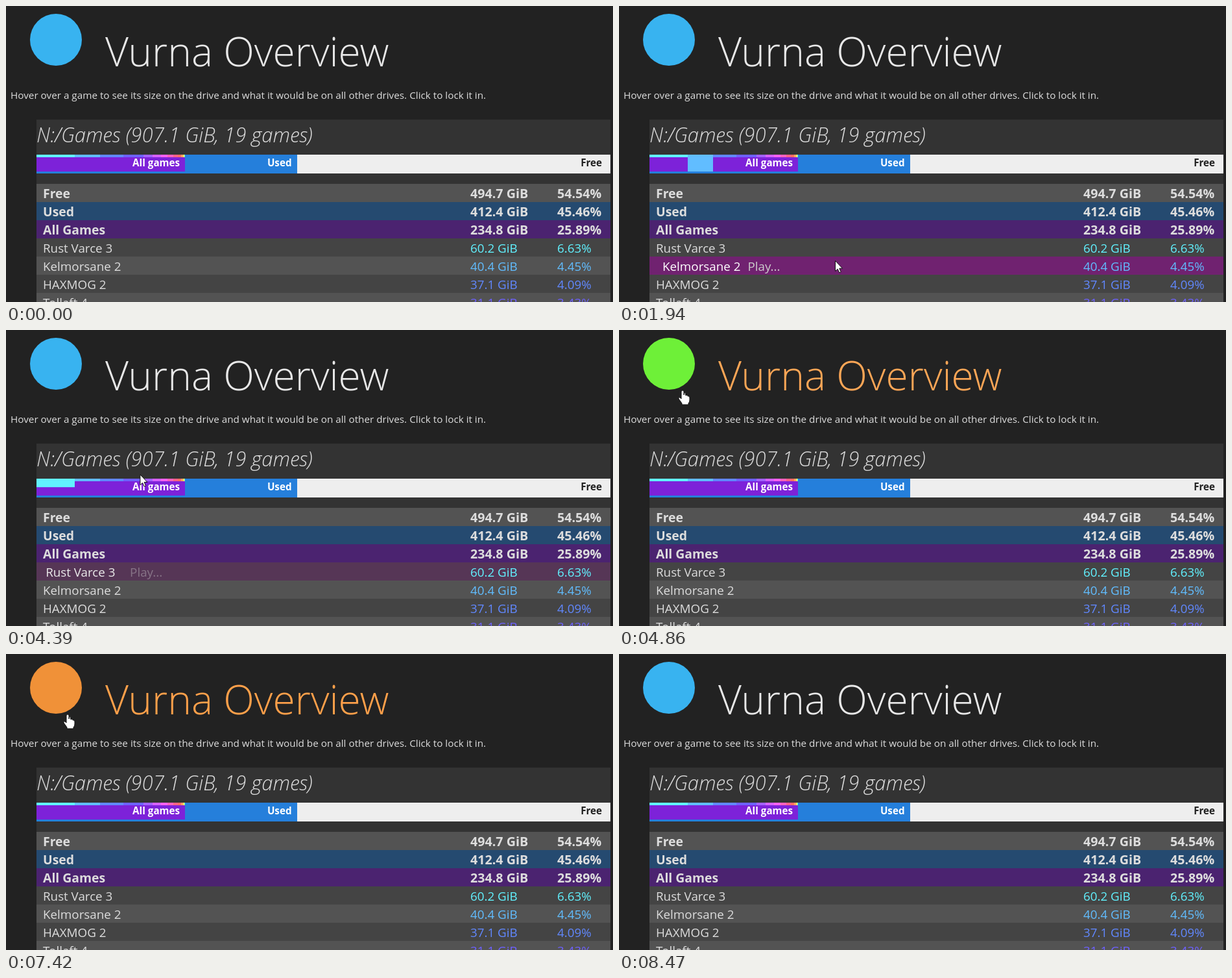
An HTML page for the animation above (8650 ms loop, 936 by 456 pixels).

```html
<!DOCTYPE html>
<html lang="en">
<head>
<meta charset="utf-8">
<title>Drive overview</title>
<style>
html, body { margin: 0; width: 100%; height: 100%; overflow: hidden; background: #222; }
svg { display: block; width: 100%; height: 100%; font-family: "Open Sans", "Noto Sans", sans-serif; }
text { white-space: pre; }
</style>
</head>
<body>
<svg id="stage" viewBox="0 0 936 456"></svg>
<script>
const LOOP = 8650;
const stage = document.getElementById('stage');

function add(tag, attrs, parent = stage) {
  const node = document.createElementNS('http://www.w3.org/2000/svg', tag);
  set(node, attrs);
  parent.appendChild(node);
  return node;
}
function set(node, attrs) {
  for (const key in attrs) node.setAttribute(key, attrs[key]);
}
function rect(x, y, width, height, fill) {
  return add('rect', { x, y, width, height, fill });
}
function label(str, x, y, size, fill, more = {}) {
  const node = add('text', { x, y, 'font-size': size, fill, ...more });
  node.textContent = str;
  return node;
}

const clamp = v => Math.min(1, Math.max(0, v));
const lerp = (a, b, p) => a + (b - a) * p;
const mix = (a, b, p) => `rgb(${a.map((v, i) => Math.round(lerp(v, b[i], p)))})`;

// cubic-bezier(.25, .1, .25, 1), the CSS "ease" curve
function ease(x) {
  x = clamp(x);
  if (x === 0 || x === 1) return x;
  const curve = (a, b, u) => 3 * a * u * (1 - u) ** 2 + 3 * b * u * u * (1 - u) + u ** 3;
  let lo = 0, hi = 1;
  for (let i = 0; i < 24; i++) {
    const mid = (lo + hi) / 2;
    if (curve(.25, .25, mid) < x) lo = mid; else hi = mid;
  }
  return curve(.1, 1, lo);
}
// 0 -> 1 after enter, 1 -> 0 after leave
const hover = (t, enter, leave, dur) => ease((t - enter) / dur) - ease((t - leave) / dur);

// Header
const logo = add('circle', { cx: 77, cy: 52, r: 40 });
const title = label('Vurna Overview', 153, 93, 62.3, '#eee', { 'font-weight': 300 });
label('Hover over a game to see its size on the drive and what it would be on all other drives. Click to lock it in.',
  7, 143, 15.28, '#ddd');

// Drive panel
rect(47, 175, 885, 281, '#333');
label('N:/Games (907.1 GiB, 19 games)', 47, 210, 31.1, '#ddd', { 'font-weight': 300, 'font-style': 'italic' });
rect(47, 229, 885, 29, '#eee');
rect(47, 229, 402, 29, '#257fdb');
rect(47, 229, 229, 26, '#7d22d9');

const hue = i => `hsl(${185 + i * 20}, 100%, 69%)`;
const shares = [6.63, 4.45, 4.09, 3.43];
const segments = [];
for (let i = 0, x = 47; i < 19; i++) {
  const w = i < 4 ? shares[i] * 8.85 : Math.max(.2, 14.5 - 1.9 * (i - 4));
  const left = Math.round(x);
  x += w;
  segments.push(rect(left, 229, Math.round(x) - left, 4, hue(i)));
}
const barLabel = (str, x, fill) => label(str, x, 247, 15.2, fill, { 'font-weight': 700, 'text-anchor': 'end' });
barLabel('All games', 268, '#fff');
barLabel('Used', 440.5, '#fff');
barLabel('Free', 919, '#222');

// Table
function row(i, name, size, share, bg, ink) {
  const y = 274 + i * 28, bold = i < 3;
  const back = rect(47, y, 885, 28, bg);
  const style = { 'font-weight': bold ? 700 : 400 };
  const nameNode = label(name, 57, y + 22, bold ? 19.4 : 18.8, '#ddd', style);
  const play = bold ? null : label('Play...', 0, y + 22, 18.8, '#ccc', { opacity: 0 });
  label(size, 716, y + 22, bold ? 19.7 : 18.8, ink, style);
  label(share, 850, y + 22, bold ? 19.7 : 18.8, ink, style);
  return { back, name: nameNode, play, width: nameNode.getComputedTextLength() };
}
row(0, 'Free', '494.7 GiB', '54.54%', '#535353', '#ddd');
row(1, 'Used', '412.4 GiB', '45.46%', '#254a70', '#ddd');
row(2, 'All Games', '234.8 GiB', '25.89%', '#4b2370', '#ddd');
const games = [
  ['Rust Varce 3', '60.2 GiB', 2535, 4222],
  ['Kelmorsane 2', '40.4 GiB', 1410, 2535],
  ['HAXMOG 2', '37.1 GiB', 275, 1410],
  ['Tollaft 4', '31.1 GiB', LOOP, LOOP]
].map(([name, size, enter, leave], i) => {
  const tone = i % 2 ? 83 : 68;
  const parts = row(i + 3, name, size, shares[i].toFixed(2) + '%', `rgb(${tone},${tone},${tone})`, hue(i));
  return { ...parts, enter, leave, base: [tone, tone, tone], segment: segments[i] };
});

// Pointers
const outline = { stroke: '#111', 'stroke-width': 1, 'stroke-linejoin': 'round', fill: '#fff' };
const arrow = add('path', { d: 'M.5 .5V16.5L4.2 13.2L6.8 18.8L9.2 17.8L6.8 12.2H11.5Z', ...outline });
const hand = add('path', {
  d: 'M-2 2Q-2 0 0 0Q2 0 2 2V7Q4-1 5 8Q8 6 8 9Q11 8 11 11V15Q11 18 9 20V22H-1V20L-6 13Q-7 10-4 11L-2 13Z',
  ...outline
});

// time, x, y of the pointer tip
const path = [
  [250, 345, 470], [390, 337, 421], [1340, 337, 421], [1450, 333, 392],
  [2490, 333, 392], [2590, 331, 371], [3810, 331, 371], [3860, 331, 370],
  [4170, 331, 371], [4390, 207, 223], [4570, 98, 93], [7419, 98, 93],
  [7420, 95, 93], [7440, 95, 93], [7800, 130, 470]
];
function pointerAt(t) {
  const i = path.findIndex(k => k[0] > t);
  if (i < 1) return null;
  const [a, b] = [path[i - 1], path[i]];
  const p = (t - a[0]) / (b[0] - a[0]);
  return [lerp(a[1], b[1], p), lerp(a[2], b[2], p)];
}

const LINK_IN = 4530, LINK_OUT = 7470;

function draw(t) {
  for (const g of games) {
    const p = hover(t, g.enter, g.leave, 500);
    set(g.back, { fill: mix(g.base, [112, 34, 112], p) });
    set(g.name, { x: 57 + 10 * p, fill: mix([221, 221, 221], [255, 255, 255], p) });
    set(g.play, { x: 78 + g.width + 10 * (1 - p), opacity: p });
    set(g.segment, { height: 4 + 22 * p });
  }

  const turn = hover(t, LINK_IN, LINK_OUT, 1000);
  set(logo, { fill: `hsl(${lerp(200, 29, turn)}, 86%, 58%)` });
  set(title, { fill: mix([232, 232, 232], [255, 160, 74], hover(t, LINK_IN, LINK_OUT, 500)) });

  const tip = pointerAt(t);
  const onLink = t >= LINK_IN && t < LINK_OUT;
  set(arrow, { display: tip && !onLink ? 'inline' : 'none' });
  set(hand, { display: tip && onLink ? 'inline' : 'none' });
  if (tip) set(onLink ? hand : arrow, { transform: `translate(${tip})` });
}

const start = performance.now();
function tick() {
  draw((performance.now() - start) % LOOP);
  requestAnimationFrame(tick);
}
tick();
</script>
</body>
</html>
```
